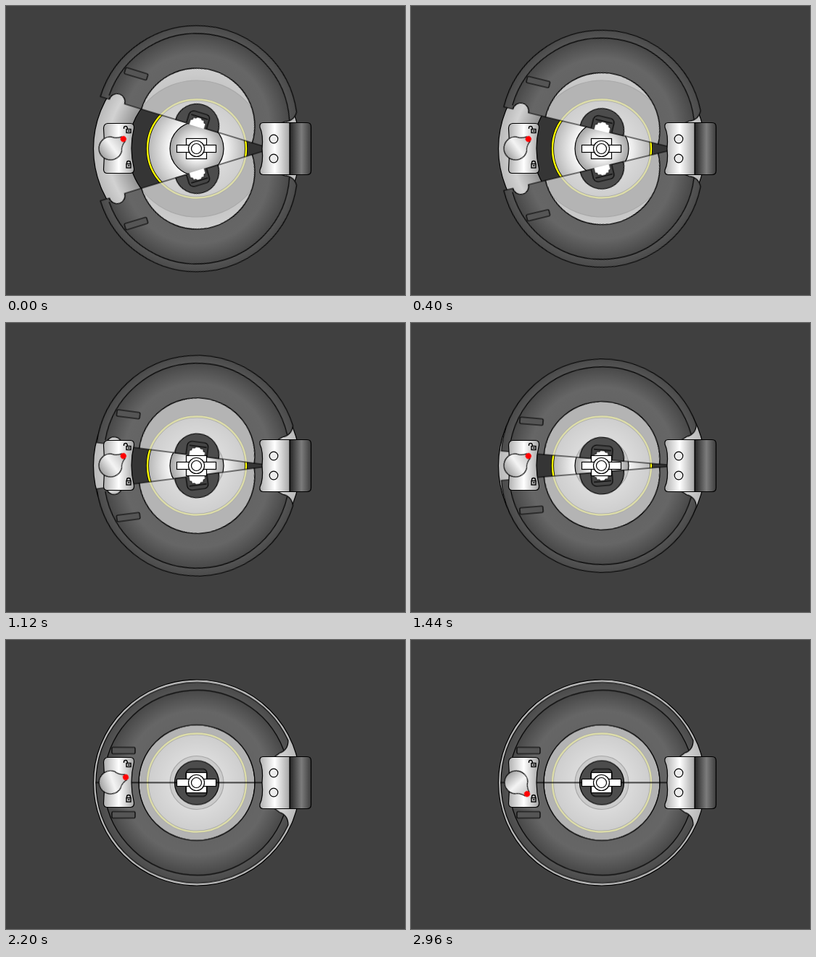
Animation, 550 px wide and 400 px high, one loop 3200 ms. Source, as an HTML page without scripts:

```html
<!DOCTYPE html>
<html lang="en">
<head>
<meta charset="utf-8">
<title>Clamp closing</title>
<style>
  html, body { margin: 0; width: 100%; height: 100%; overflow: hidden; background: #404040; }
  svg { display: block; width: 550px; height: 400px; }
  .ink { stroke: #000; stroke-width: 1.2; }
  .line { fill: none; }
  .jaw, .lever { animation: close 3200ms -1ms infinite; }
  .lever { animation-name: turn; }
  @keyframes close {
    0% { transform: translate(263px, 166px) rotate(17deg); animation-timing-function: steps(50, end); }
    62.5%, 100% { transform: translate(263px, 197.5px) rotate(0deg); }
  }
  @keyframes turn {
    0% { transform: translate(144px, 197px) rotate(-36deg); }
    62.5% { transform: translate(144px, 197px) rotate(-36deg); animation-timing-function: steps(24, end); }
    92.5%, 100% { transform: translate(145px, 197px) rotate(47deg); }
  }
</style>
</head>
<body>
<svg viewBox="0 0 550 400" xmlns="http://www.w3.org/2000/svg">
  <defs>
    <radialGradient id="flange" gradientUnits="userSpaceOnUse" cx="263" cy="197.5" r="143">
      <stop offset=".66" stop-color="#929292"/>
      <stop offset=".86" stop-color="#d2d2d2"/>
      <stop offset="1" stop-color="#b8b8b8"/>
    </radialGradient>
    <radialGradient id="dish">
      <stop offset=".5" stop-color="#fff"/>
      <stop offset="1" stop-color="#b4b4b4"/>
    </radialGradient>
    <radialGradient id="hub">
      <stop offset=".35" stop-color="#fff"/>
      <stop offset="1" stop-color="#a2a2a2"/>
    </radialGradient>
    <radialGradient id="shell" gradientUnits="userSpaceOnUse" cx="0" cy="0" r="139">
      <stop offset=".57" stop-color="#646464"/>
      <stop offset=".72" stop-color="#666"/>
      <stop offset=".92" stop-color="#484848"/>
      <stop offset=".921" stop-color="#545454"/>
      <stop offset="1" stop-color="#4a4a4a"/>
    </radialGradient>
    <linearGradient id="plate">
      <stop offset="0" stop-color="#b0b0b0"/>
      <stop offset=".5" stop-color="#fff"/>
      <stop offset="1" stop-color="#a4a4a4"/>
    </linearGradient>
    <linearGradient id="barrel">
      <stop offset="0" stop-color="#242424"/>
      <stop offset=".55" stop-color="#7c7c7c"/>
      <stop offset="1" stop-color="#3c3c3c"/>
    </linearGradient>
    <linearGradient id="knob">
      <stop offset="0" stop-color="#a0a0a0"/>
      <stop offset=".5" stop-color="#f4f4f4"/>
      <stop offset="1" stop-color="#c4c4c4"/>
    </linearGradient>

    <!-- upper jaw, origin at the ring centre -->
    <g id="half">
      <path class="ink" fill="#d4d4d4" fill-opacity=".8" d="M-80 0A80 80 0 0 1 80 0Z"/>
      <path class="ink" fill="url(#shell)" d="M-139 0A139 139 0 0 1 126 -58.5Q126 -45 114 -41L106 -35V0H80A80 80 0 0 0 -80 0H-104A11 11 0 0 0 -126 0Z"/>
      <path class="ink line" d="M-127.9 -5A128 128 0 0 1 119.8 -45"/>
      <rect class="ink" x="-117" y="-49" width="32" height="9" rx="1.5" fill="#555"/>
      <path class="ink" fill="#4c4c4c" d="M-30.5 0A30.5 30.5 0 0 1 30.5 0Z"/>
      <path class="ink" fill="#454545" d="M-15 0V-13Q-14 -18 -9 -19H9Q14 -18 14 -13V0"/>
      <path class="ink line" d="M-12 -13H12"/>
      <path fill="#fff" stroke="#000" stroke-width=".8" d="M-11 1V-6L-8 -7V-10H-4L-3 -12H3L4 -10H8V-7L11 -6V1"/>
    </g>
  </defs>

  <rect width="550" height="400" fill="#404040"/>

  <circle class="ink" cx="263" cy="197.5" r="142.5" fill="url(#flange)"/>
  <circle class="ink" cx="263" cy="197.5" r="94.5" fill="#353535"/>
  <circle cx="263" cy="197.5" r="68" fill="url(#dish)" stroke="#000" stroke-width="4"/>
  <circle class="line" cx="263" cy="197.5" r="68" stroke="#ff0" stroke-width="2.4"/>
  <circle class="ink" cx="263" cy="197.5" r="37" fill="url(#hub)"/>

  <g class="jaw"><use href="#half"/></g>
  <g transform="matrix(1 0 0 -1 0 395)">
    <g class="jaw"><use href="#half"/></g>
  </g>

  <g class="ink" fill="#fff">
    <rect x="248.5" y="183.5" width="28" height="28"/>
    <rect x="235.5" y="192.5" width="54" height="10"/>
    <circle cx="262.5" cy="197.5" r="11"/>
    <circle cx="262.5" cy="197.5" r="7"/>
  </g>

  <!-- hinge -->
  <path class="ink" fill="url(#barrel)" d="M391 161.5H415Q420.5 161.5 420.5 167V228Q420.5 233.5 415 233.5H391Z"/>
  <path class="ink" fill="url(#plate)" d="M391 161.5H354Q349 162 350 168Q355 178 353 197.5Q355 217 350 227Q349 233 354 233.5H391Z"/>
  <g class="ink" fill="#ececec">
    <circle cx="369" cy="184" r="5.8"/>
    <circle cx="369" cy="211" r="5.8"/>
  </g>

  <!-- latch -->
  <path class="ink" fill="url(#plate)" d="M140 162.5H172Q177 163 176.5 169Q169.5 197 176.5 225Q177 231 172 231.5H139Q134.5 231 134.5 226L136 197L134.5 169Q135 163 140 162.5Z"/>
  <g class="line" stroke="#000" stroke-width="1.4">
    <path d="M162.5 170V168.5Q162.5 166.5 165 166.5Q167.5 166.5 167.5 170.5"/>
    <rect x="166" y="170.5" width="6" height="5"/>
    <path d="M166.5 218V217Q166.5 214.5 169 214.5Q171.5 214.5 171.5 217V218"/>
    <rect x="166" y="218.5" width="6" height="5.5"/>
    <path d="M168 173H170.5M168 221H170.5"/>
  </g>
  <g class="lever">
    <path class="ink" fill="url(#knob)" d="M22 -4Q14 -6 10 -12.5A16 16 0 1 0 10 12.5Q14 6 22 4Z"/>
    <circle cx="22" cy="0" r="4" fill="#f00"/>
  </g>
</svg>
</body>
</html>
```
